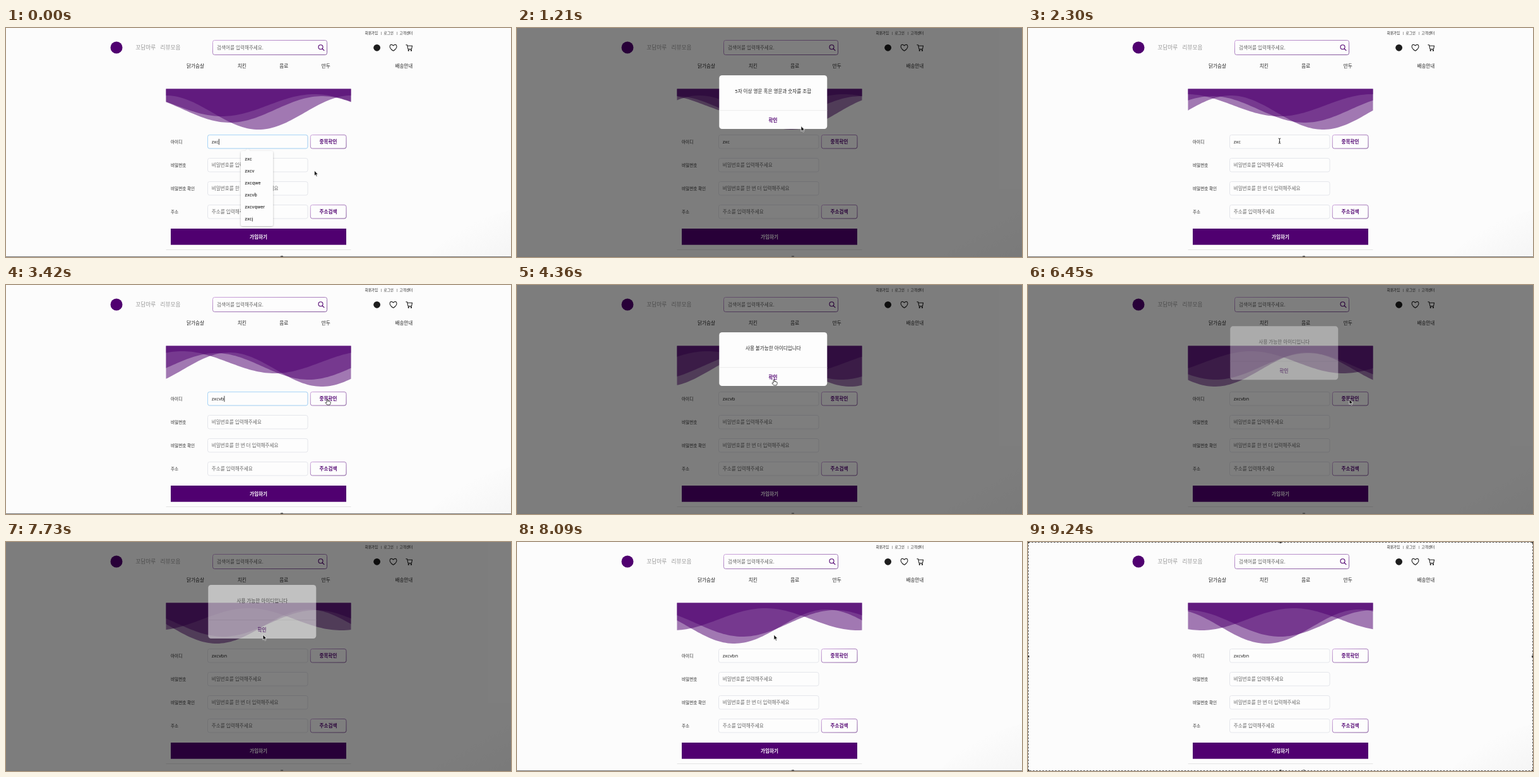
An HTML page that plays this animation: 800x363 px, repeating every 9.27 s.

```html
<!DOCTYPE html>
<html lang="ko">
<head>
<meta charset="utf-8">
<title>회원가입</title>
<style>
html, body { margin: 0; width: 100%; height: 100%; overflow: hidden; background: #fcfcfc; }
svg { display: block; width: 800px; height: 363px; }
text { font: 400 7.6px "Noto Sans", "Noto Sans CJK KR", sans-serif; fill: #222; white-space: pre; }
.mid { text-anchor: middle; }
.bold { font-weight: 700; }
.med { font-weight: 500; }
.hint { fill: #666; }
.purple { fill: #500070; }
.white { fill: #fff; }
.brand { font-size: 8.7px; fill: #999; }
.label { font-size: 6.6px; font-weight: 500; }
.top { font-size: 5.6px; font-weight: 500; }
.item { font: 500 6.9px Inter, sans-serif; }
.icon { fill: none; stroke: #222; stroke-width: 1.1; stroke-linecap: round; stroke-linejoin: round; }
</style>
</head>
<body>
<svg viewBox="0 0 800 363">
  <defs>
    <linearGradient id="edge" x1="0" y1="0" x2="1" y2="1">
      <stop offset="0" stop-color="#c79ad8"/><stop offset="1" stop-color="#74418f"/>
    </linearGradient>
    <linearGradient id="corner" x1="0" y1="0" x2="1" y2="1">
      <stop offset=".4" stop-color="#fcfcfc"/><stop offset="1" stop-color="#f5f5f5"/>
    </linearGradient>
    <filter id="soft" x="-20%" y="-20%" width="140%" height="140%">
      <feDropShadow dx="0" dy="1" stdDeviation="1.6" flood-opacity=".28"/>
    </filter>
  </defs>
  <rect width="800" height="363" fill="#fcfcfc"/>
  <path d="M670 363Q710 310 800 288V363Z" fill="url(#corner)"/>
  <g id="page"></g>
  <g id="waves" fill="#500070" fill-opacity=".52"></g>
  <g id="form"></g>
  <g id="idField">
    <rect id="ring" x="319.5" y="169.5" width="158.5" height="21.5" rx="3" fill="none"/>
    <text id="value" x="325.8" y="183.2"></text>
    <path id="caret" stroke="#111" stroke-width=".8"/>
  </g>
  <g id="list" filter="url(#soft)"></g>
  <rect id="shade" width="800" height="363" fill="#000" fill-opacity=".5"/>
  <g id="dialog">
    <rect x="320.3" y="75" width="171" height="85" rx="4.5" fill="#fdfdfd"/>
    <path d="M320.3 130.7h171" stroke="#e6e6e6" stroke-width=".8"/>
    <text id="message" class="mid med" x="405.8" y="102.8"></text>
    <text class="mid bold purple" x="405.6" y="148.6">확인</text>
  </g>
  <path d="M0 362.5H800" stroke="#777"/><path d="M435 362h4" stroke="#444" stroke-width="1.5"/>
  <g id="cursor">
    <path id="arrow" d="M0 0V8.2L1.9 6.5 3.2 9.4 4.6 8.8 3.3 6H5.8Z" fill="#111" stroke="#fff" stroke-width=".7"/>
    <path id="beam" d="M-1.8-4Q0-4 0-3Q0-4 1.8-4M0-3V3M-1.8 4Q0 4 0 3Q0 4 1.8 4M-1 1.4H1" fill="none" stroke="#222" stroke-width=".9"/>
    <path id="hand" d="M-.9 5V.8Q0-.6.9.8V3.4Q2-.1 2.5 3.6 3.4 2.7 4 4 5.3 3.2 5.2 5.3 5.2 7.4 4 9H-.3L-3 5.7Q-2.8 4.1-.9 5.4Z" fill="#fff" stroke="#222" stroke-width=".8"/>
  </g>
  <g id="selection">
    <rect x=".5" y=".5" width="799" height="362" fill="none" stroke="#fff"/>
    <rect x=".5" y=".5" width="799" height="362" fill="none" stroke="#555" stroke-dasharray="3 2"/>
    <path d="M398.500 0h3v2h-3zM398.500 361h3v2h-3zM0 180h2v3h-2zM798 180h2v3h-2zM0 0h2v2h-2zM798 0h2v2h-2zM0 361h2v2h-2zM798 361h2v2h-2z" fill="#444"/>
  </g>
</svg>
<script>
const LOOP = 9270, LEFT = 253.5, WIDTH = 293, FADE = 200;
const $ = id => document.getElementById(id);
const show = (id, on) => $(id).style.display = on ? '' : 'none';
const text = (s, x, y, cls = '') => `<text x="${x}" y="${y}" class="${cls}">${s}</text>`;
const box = (x, y, w, h, stroke) =>
  `<rect x="${x}" y="${y}" width="${w}" height="${h}" rx="3" fill="#fdfdfd" stroke="${stroke}" stroke-width=".9"/>`;

$('page').innerHTML =
  '<circle cx="175" cy="31" r="9.5" fill="#500070"/>' +
  text('꼬담마루', 205.300, 34.300, 'brand') + text('리뷰모음', 244.500, 34.300, 'brand') +
  [['회원가입', 568.5], ['|', 593.2], ['로그인', 598.5], ['|', 618], ['고객센터', 623.6]]
    .map(([s, x]) => text(s, x, 10.1, 'top')).join('') +
  box(327.5, 19.5, 181, 23, 'url(#edge)') + text('검색어를 입력해주세요.', 334, 33.8, 'hint') +
  '<g class="icon"><circle cx="498.500" cy="30.300" r="3.500" stroke="#500070"/><path d="M501.200 33L504 35.700" stroke="#500070"/>' +
  '<path d="M613.500 36.200C604 30.200 609 23.200 613.500 28 618 23.200 623 30.200 613.500 36.200Z"/>' +
  '<path d="M633.700 26.700H635.400L637 33.600H642.400L643.500 28.300H636"/></g>' +
  '<circle cx="637.700" cy="35.700" r="1.100"/><circle cx="641.900" cy="35.700" r="1.100"/>' +
  '<circle cx="587.600" cy="31.300" r="5.400" fill="#1d1d1d"/>' +
  [['닭가슴살', 286], ['치킨', 366.800], ['음료', 433.200], ['만두', 499.800], ['배송안내', 616.400]]
    .map(([s, x]) => text(s, x, 62.600, 'med')).join('');

const rows = [['아이디', ''], ['비밀번호', '비밀번호를 입력해주세요'],
  ['비밀번호 확인', '비밀번호를 한 번 더 입력해주세요'], ['주소', '주소를 입력해주세요']];
const button = (s, y) => box(482.300, y, 56.700, 21.500, 'url(#edge)') + text(s, 510.600, y + 13.700, 'mid bold purple');
$('form').innerHTML = rows.map(([label, hint], i) => {
  const y = 169.5 + 37 * i;
  return text(label, 261, y + 13.2, 'label') + box(319.5, y, 158.5, 21.5, '#e2e4e9') + text(hint, 325.8, y + 13.7, 'hint');
}).join('') + button('중복확인', 169.5) + button('주소검색', 280.5) +
  '<rect x="261" y="318" width="278" height="25.700" fill="#500070"/>' + text('가입하기', 400, 333.700, 'mid bold white') +
  '<path d="M253.500 351.500h293" stroke="#ddd" stroke-width=".8"/>';

// middle height, amplitude, trough x at the start, period in seconds
const waves = [[134, 27, 400, 10], [122.5, 17.5, 342, 12], [129, 21, 354, 8]];
$('waves').innerHTML = '<path/>'.repeat(waves.length);
function drawWaves(t) {
  waves.forEach(([mid, amp, trough, period], i) => {
    const start = trough + WIDTH * t / 1000 / period;
    let d = `M${LEFT + WIDTH} 96.5H${LEFT}`;
    for (let n = 0; n <= 80; n++) {
      const x = LEFT + WIDTH * n / 80;
      d += `L${x.toFixed(2)} ${(mid + amp * Math.cos(2 * Math.PI * (x - start) / WIDTH)).toFixed(2)}`;
    }
    $('waves').children[i].setAttribute('d', d + 'Z');
  });
}

const saved = ['zxc', 'zxcv', 'zxcqwe', 'zxcvb', 'zxcvqwer', 'zxcj'];
const typed = [[0, 'zxc'], [2750, 'zxcv'], [2900, 'zxcvb'], [5850, 'zxcvbn']];
const focus = [[0, 650], [2450, 3450], [5420, 6280]];
const suggest = [[0, 600], [2750, 3250]];
const within = (spans, t) => spans.some(([a, b]) => t >= a && t < b);

function drawField(t) {
  const value = typed.filter(e => e[0] <= t).pop()[1], focused = within(focus, t);
  $('value').textContent = value;
  $('ring').setAttribute('stroke', focused ? '#a9d6f8' : 'none');
  $('caret').setAttribute('d', `M${326.3 + $('value').getComputedTextLength()} 175.800v9.400`);
  show('caret', focused);
  show('list', within(suggest, t));
  const items = saved.filter(s => s.startsWith(value));
  $('list').innerHTML =
    `<path d="M375 195H379.500L383 191.500 386.500 195H420Q423 195 423 198V${197 + 19 * items.length}q0 3-3 3H375q-3 0-3-3V198Q372 195 375 195Z" fill="#fdfdfd"/>` +
    items.map((s, i) => text(s, 378.2, 209.8 + 19 * i, 'item')).join('');
}

const dialogs = [[780, 1930, '5자 이상 영문 혹은 영문과 숫자를 조합'],
  [3560, 4760, '사용 불가능한 아이디입니다'], [6380, 7638, '사용 가능한 아이디입니다']];
function drawDialog(t) {
  const open = dialogs.find(([a, b]) => t >= a && t < b + FADE);
  show('shade', open);
  show('dialog', open);
  if (!open) return 0;
  const k = Math.min(1, (t - open[0]) / FADE, 1 - (t - open[1]) / FADE);
  $('message').textContent = open[2];
  $('dialog').setAttribute('opacity', k);
  $('dialog').setAttribute('transform', `translate(0 ${-15 * (1 - k)})`);
  return k;
}

// time and pointer position
const route = [[0, 488.5, 226], [150, 488.5, 226], [550, 510, 182], [880, 508, 181], [1210, 450, 155.5],
  [1500, 407, 148], [1960, 406, 148], [2300, 398.5, 179], [2950, 398, 180], [3350, 509, 181], [3680, 509, 181],
  [4150, 407, 150], [4800, 407, 150], [5240, 391.5, 192], [5400, 392, 181], [5900, 392, 181], [6250, 509, 181],
  [6500, 509, 181], [7050, 407, 147], [LOOP, 407, 147]];
function drawCursor(t, open) {
  const n = route.findIndex(p => p[0] > t), [t0, x0, y0] = route[n - 1], [t1, x1, y1] = route[n];
  const u = (t - t0) / (t1 - t0), e = u * u * (3 - 2 * u);
  const x = x0 + (x1 - x0) * e, y = y0 + (y1 - y0) * e;
  const inside = (a, b, c, d) => x > a && x < b && y > c && y < d;
  const hand = open ? open === 1 && inside(392, 420, 138, 154) : inside(482, 539, 169, 191);
  const beam = !open && inside(320, 478, 169, 191);
  $('cursor').setAttribute('transform', `translate(${x} ${y})`);
  show('hand', hand);
  show('beam', beam);
  show('arrow', !hand && !beam);
}

function draw(now) {
  const t = now % LOOP, ended = t >= 8400;
  drawWaves(t);
  drawField(t);
  drawCursor(t, drawDialog(t));
  show('cursor', !ended);
  show('selection', ended);
}
const begin = performance.now();
function tick() {
  draw(performance.now() - begin);
  requestAnimationFrame(tick);
}
tick();
</script>
</body>
</html>
```
